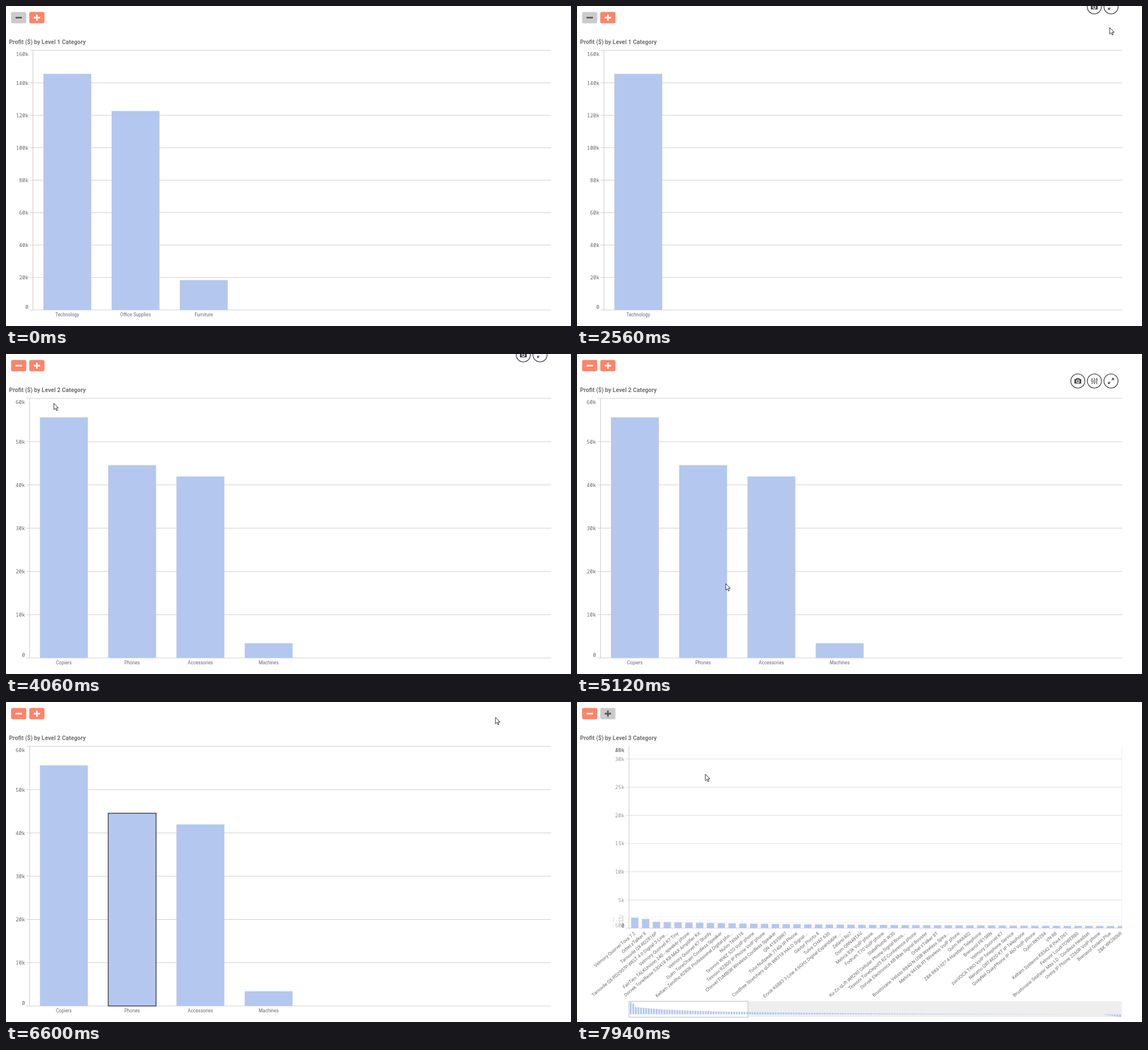
An HTML page that plays this animation: 995 px wide and 563 px high, repeating every 8 s.

```html
<!DOCTYPE html>
<html lang="en">
<head>
<meta charset="utf-8">
<title>Profit drill-down</title>
<style>
  html, body { margin: 0; width: 100%; height: 100%; overflow: hidden; background: #fff; }
  svg { display: block; width: 100vw; height: 100vh; }
  text { font-family: Roboto, "Liberation Sans", sans-serif; font-size: 8.15px; fill: #6a6a6a; }
  .title { font-size: 10.3px; font-weight: 700; fill: #737373; }
  .tick { font-family: "Noto Sans Mono", "DejaVu Sans Mono", monospace; font-size: 9.2px; text-anchor: end; }
  .cat { text-anchor: middle; }
  .item { text-anchor: end; }
</style>
</head>
<body>
<svg id="stage" viewBox="0 0 995 563"></svg>
<script>
const LOOP = 8000, RIGHT = 960, TOP = 78;
const BAR = '#b4c7ef', GRID = '#cfcfcf', INK = '#4a4a4a', CORAL = '#ff8469';
const stage = document.getElementById('stage');

// Moments at which the chart changes
const SELECT_1 = 900, CLOSE_1 = 2180, FILTER_1 = 2300;
const LEVEL_2 = 3497;
const SELECT_2 = 5400, CLOSE_2 = 6300, FILTER_2 = 6748;
const LEVEL_3 = 7787;

const level1 = [['Technology', 145.5], ['Office Supplies', 122.6], ['Furniture', 18.4]];
const level2 = [['Copiers', 55.6], ['Phones', 44.55], ['Accessories', 41.95], ['Machines', 3.4]];
const items = `Velmory Quorvel Tova 7.2
Orbel zTalker 8
Tarnovile QX-RD2816P
Tarnovile QX-RD2907P WELT 4.0 Digital 3-Line...
Velmory Quorvel K7 Tiny
FairTwo TALKUnison 240 - speaker phone
Dorvek ToneRaise 530418 KB MAX Amplifier Kit
Velmory Quorvel K7 Sturdy
Dulm ToneChain Cordless Speaker
Keltam Zenitho R2806 Professional Digital pho...
Nulvo TKN418
Tesvoni WWZ 520 VoIP phone
Tesvoni RZ800 IP Phone VoIP phone
Chinvel TUMBOR Wireless Cordless Speaker
QN 41835RR7
Tolvi NuSpeak 7140r IP Phone
Cordfree Stretchers qLift WR318 HALO Signal ...
Gavlor Pivoto 8
Tulva CHAT 630
Ervok K6883 3-Line 4.6GHz Digital Expandable ...
Zelano Ro7
Dorn QRN48TAV
Melvra 83k VoIP phone
Fodrum T70 VoIP phone
SlatePlumb W30
Ku-Zo qLift WR290 Cellular Phone Signal Boos...
Tesvoni ToneDepot5 RZ Conference phone
Dorvek Electronics KB Max Signal Booster
Orbel zTalker 8T
Brustovane Velisto R840-N USB Wireless Spea...
Melvra 9418k RT Wireless VoIP phone
Qulm RK8402
Z&amp;K RK61927 4-Handset Telephone
Brenavol P815RN
Velmory Quorvel K7
zunVOCA TRIO VoIP Telephone Service
Nerumo QRT4820-KT IP Telephone
QuayNel QuayPhone IP 460 VoIP phone
Qulm RK9284
VN R8
Keltam Systems K8542 R Pw4 D61
Felnoor LoudiTOWER80
Brustovane Seafarer Max LD - Cordless Headset
Uvera IP Phone 2260R VoIP phone
Brenavol Golem Plus
Z&amp;K WK2806R`.split('\n');

// Pointer path: time, x, y
const path = [
  [70, 815, 440], [140, 610, 268], [210, 428, 119], [440, 428, 119], [820, 107, 264],
  [1290, 107, 264], [2050, 938, 38], [2800, 938, 38], [3400, 52, 29], [3720, 52, 29],
  [5050, 262, 404], [5420, 262, 404], [5900, 970, 62], [6130, 938, 38], [6380, 938, 38],
  [6600, 862, 27], [7130, 105, 34], [7350, 52, 25], [7700, 52, 25], [7790, 76, 38],
  [7940, 226, 127], [8000, 250, 142]
];

const clamp = (v, a, b) => Math.min(b, Math.max(a, v));
const mix = (a, b, p) => a + (b - a) * p;
const ease = p => (1 - Math.cos(Math.PI * clamp(p, 0, 1))) / 2;
const during = (t, a, b) => t >= a && t < b;

const rect = (x, y, w, h, fill, more = '') =>
  `<rect x="${x}" y="${y}" width="${w}" height="${h}" fill="${fill}" ${more}/>`;
const line = (x1, y1, x2, y2, color = GRID, more = '') =>
  `<path d="M${x1} ${y1}L${x2} ${y2}" stroke="${color}" fill="none" ${more}/>`;
const text = (x, y, s, cls, more = '') =>
  `<text x="${x}" y="${y}" class="${cls}" ${more}>${s}</text>`;
const stroke = (d, color, width, more = '') =>
  `<path d="${d}" fill="none" stroke="${color}" stroke-width="${width}" ${more}/>`;
const at = (x, y, s) => `<g transform="translate(${x} ${y})">${s}</g>`;

function button(x, on, plus) {
  const ink = on ? '#fff' : '#595959';
  return rect(x, 10.5, 26.7, 20, on ? CORAL : '#cbcbcb', 'rx="3"') +
    stroke(`M${x + 7.8} 20.5h11.2` + (plus ? `M${x + 13.4} 14.9v11.2` : ''), ink, 2.8);
}

const glyphs = {
  camera: `<path d="M-6-3.5h2.5l1-1.5h5l1 1.5H6v8H-6Z" fill="${INK}"/>` +
    `<circle cy=".5" r="2.4" fill="none" stroke="#fff" stroke-width="1.3"/>`,
  sliders: stroke('M-4-5.5v3M-4 1v4.5M0-5.5v5.5M0 3.5v2M4-5.5v2M4 0v5.5', INK, 1.2) +
    [[-4, -.8], [0, 1.8], [4, -1.8]].map(([x, y]) =>
      `<circle cx="${x}" cy="${y}" r="1.5" fill="none" stroke="${INK}"/>`).join(''),
  expand: stroke('M1.3-1.3 4-4M-1.3 1.3-4 4', INK, 1.4) +
    `<path d="M5.3-5.3v4.2L1.1-5.3ZM-5.3 5.3V1.1L-1.1 5.3Z" fill="${INK}"/>`
};
const roundIcon = (x, y, name) => at(x, y,
  `<circle r="12.4" fill="#fff" stroke="${INK}" stroke-width="1.4"/>` + glyphs[name]);

function panelBar() {
  return rect(5.5, 27, 955, 29, '#fff') + line(5, 56, 960, 56, '#d9d9d9') +
    stroke('M823.5 47c-1.5-1 0-2.5 1.3-3.3M824.8 43.7c-3.5-.8-3.5-6.5 2-6.7 6.5-.2 6.5 6.500 0 6.800-1 0-2-.1-2.500-1', INK, 1.3) +
    stroke('M856 36.500h11v10h-11Z', INK, 1.2, 'stroke-dasharray="2.2 1.800"') +
    `<circle cx="865.5" cy="43.500" r="3.9" fill="${INK}" stroke="#fff"/>` +
    stroke('M864 42l3 3m0-3l-3 3', '#fff', 1) +
    line(882.5, 32, 882.5, 51, '#dedede') +
    rect(888.5, 32, 29.5, 19, '#f05555', 'rx="2"') +
    stroke('M899 37l9 9m0-9l-9 9', '#fff', 1.7) +
    rect(923.5, 32, 30, 19, '#5faa26', 'rx="2"') +
    stroke('M933.500 41.500l3.500 3.500 7-7.200', '#fff', 2.2);
}

const panelFrame = () => rect(5.5, 27, 955, 528.5, 'none', 'rx="2" stroke="#b5b5b5"');

// Value axis: the range and the tick step before and after a change
function axisAt(t) {
  const move = (start, from, to) => ({ from, to, p: ease((t - start) / 420) });
  const a = { lo: 0, hi: 160, step: 20 }, b = { lo: 0, hi: 60, step: 10 };
  const c = { lo: 0, hi: 45, step: 5 }, d = { lo: -.5, hi: 2, step: .5 };
  if (t < LEVEL_2) return move(0, a, a);
  if (t < FILTER_2) return move(LEVEL_2, a, b);
  if (t < LEVEL_3) return move(FILTER_2, b, c);
  return move(LEVEL_3, c, d);
}

function ticks({ lo, hi, step }) {
  const list = [];
  for (let v = lo; v <= hi; v += step) list.push(v);
  return list;
}

const tickName = v => v === 0 ? '0' : Math.abs(v) < 1 ? v * 1000 : v + 'k';

function drawAxis(axis, left, base, y) {
  const old = ticks(axis.from), next = ticks(axis.to);
  let out = '';
  for (const v of new Set([...old, ...next])) {
    const alpha = (old.includes(v) ? 1 - axis.p : 0) + (next.includes(v) ? axis.p : 0);
    if (alpha < .01) continue;
    const ty = y(v), fade = `opacity="${alpha}"`;
    if (ty >= TOP - .5 && ty <= base + .5) out += line(left - 6, ty, RIGHT, ty, GRID, fade);
    out += text(left - 8, clamp(ty, 84.5, base - 5.5) + 3.4, tickName(v), 'tick', fade);
  }
  return out + line(left, TOP, left, base, '#cacaca');
}

function drawBars(data, pick, left, base, y, t, [select, close, filter]) {
  const open = during(t, select, close), marked = during(t, select, filter);
  const q = ease((t - filter) / 250);
  return data.map(([name, value], i) => {
    const chosen = i === pick;
    const alpha = chosen ? 1 : (1 - q) * (open ? .5 : 1);
    if (alpha < .01) return '';
    const x = left + 18.3 + 120.2 * (chosen ? mix(i, 0, q) : i), top = y(value);
    const edge = chosen && marked ? 'stroke="#333" stroke-width="1.3"' : '';
    const ink = open && chosen ? 'style="fill:#404040"' : '';
    return `<g opacity="${alpha}">` + rect(x, top, 84.3, base - top, BAR, edge) +
      text(x + 42.1, 546, name, 'cat', ink) + '</g>';
  }).join('');
}

function itemValue(i) {
  if (i < 2) return 1.85 - i * .22;
  if (i > 182) return -.06 * (i - 182);
  return 1.22 / (1 + .048 * i) - .0007 * i;
}

function drawItems(left, y) {
  let out = line(RIGHT - .5, TOP, RIGHT - .5, 399, '#f0f0f0');
  items.forEach((name, i) => {
    const x = left + 3.8 + 19.04 * i, top = y(itemValue(i));
    out += rect(x, top, Math.min(13, RIGHT - x), y(0) - top, BAR) +
      at(x + 8, 408, text(0, 0, name, 'item', 'transform="rotate(-40)"'));
  });
  return out + drawOverview(left);
}

function drawOverview(left) {
  let out = rect(left, 526.5, 868, 28, '#fff') + rect(301, 526.5, 658.5, 28, '#eee');
  for (let i = 0; i < 190; i++) {
    const h = itemValue(i) * 11.6;
    out += rect(left + 1.4 + 4.56 * i, 549.5 - Math.max(h, 0), 3.2, Math.abs(h), BAR);
  }
  return out + rect(left, 526.5, 209.5, 28, 'none', 'stroke="#bdbdbd"');
}

function pointerAt(t) {
  const i = path.findIndex(k => k[0] > t);
  if (i < 1) return null;
  const [t0, x0, y0] = path[i - 1], [t1, x1, y1] = path[i];
  const p = ease((t - t0) / (t1 - t0));
  return [mix(x0, x1, p), mix(y0, y1, p)];
}

function drawPointer(t) {
  const pos = pointerAt(t);
  if (!pos) return '';
  const [x, y] = pos, hand = x > 41 && x < 68 && y < 31;
  const d = hand
    ? 'M0 0c-1 0-1.4.7-1.4 1.5V8l-1.8-1.4c-1-.6-2 .4-1.400 1.300L-1.500 13H5.200L6.800 9V5.200c0-1.500-1.800-1.500-1.900-.4 0-1.500-2-1.600-2.200-.3 0-1.400-1.700-1.500-1.700-.3V1.500C1.400.7 1 0 0 0Z'
    : 'M0 0V11.500L2.700 9 4.600 13 6.400 12.200 4.500 8.300H8Z';
  return at(x, y, `<path d="${d}" fill="#fff" stroke="#222" stroke-width=".95" stroke-linejoin="round"/>`);
}

function drawIcons(t) {
  if (during(t, 440, SELECT_1) || during(t, 4515, SELECT_2))
    return ['camera', 'sliders', 'expand'].map((n, i) => roundIcon(882 + 29.2 * i, 47.5, n)).join('');
  if (during(t, 2480, 4300) || during(t, 6680, 7860))
    return roundIcon(911, 1.5, 'camera') + roundIcon(940.5, 1.5, 'expand');
  return '';
}

function draw(t) {
  const level = t < LEVEL_2 ? 1 : t < LEVEL_3 ? 2 : 3;
  const left = [47.5, 41.5, 91.5][level - 1], base = level === 3 ? 399.3 : 534.8;
  const axis = axisAt(t);
  const lo = mix(axis.from.lo, axis.to.lo, axis.p), hi = mix(axis.from.hi, axis.to.hi, axis.p);
  const y = v => base - (v - lo) / (hi - lo) * (base - TOP);
  const open = during(t, SELECT_1, CLOSE_1) || during(t, SELECT_2, CLOSE_2);

  let out = rect(0, 0, 995, 563, '#fff') + button(9, level > 1, false) + button(41, level < 3, true);
  if (open) out += panelBar();
  out += text(5.3, 66.6, `Profit ($) by Level ${level} Category`, 'title');
  out += drawAxis(axis, left, base, y);
  if (level === 1) out += drawBars(level1, 0, left, base, y, t, [SELECT_1, CLOSE_1, FILTER_1]);
  if (level === 2) out += drawBars(level2, 1, left, base, y, t, [SELECT_2, CLOSE_2, FILTER_2]);
  if (level === 3) out += drawItems(left, y);
  if (open) out += panelFrame();
  stage.innerHTML = out + drawIcons(t) + drawPointer(t);
}

const begin = performance.now();
function tick() {
  draw((performance.now() - begin) % LOOP);
  requestAnimationFrame(tick);
}
tick();
</script>
</body>
</html>
```
